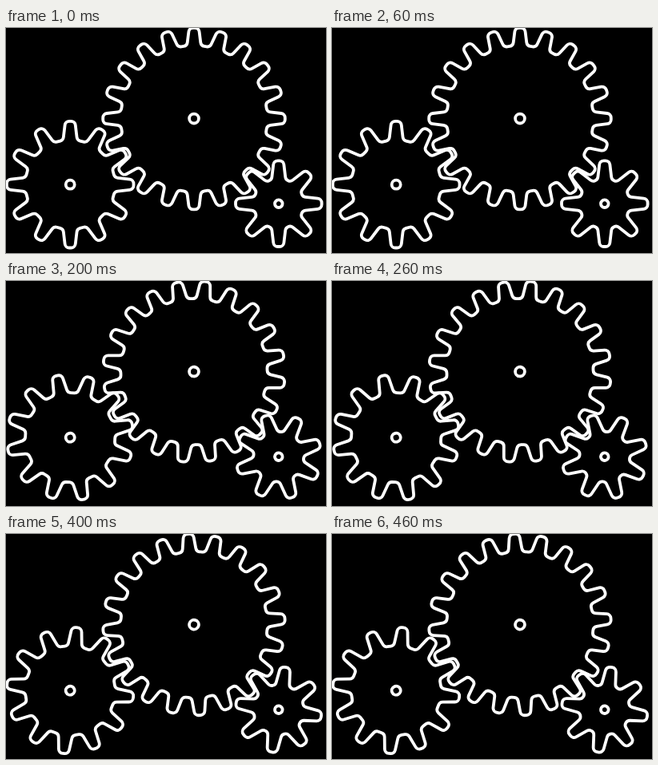
An HTML page with a canvas for the animation above (0.5 s loop, 400 px wide and 282 px high).

```html
<!DOCTYPE html>
<html lang="en">
<head>
<meta charset="utf-8">
<title>Gears</title>
<style>
  html, body { margin: 0; width: 100%; height: 100%; overflow: hidden; background: #000; }
  canvas { display: block; }
</style>
</head>
<body>
<canvas id="stage" width="400" height="282"></canvas>
<script>
const ctx = document.getElementById('stage').getContext('2d');
const STEP_MS = 100, STEPS = 5;

// spin: 1 = clockwise, -1 = counter-clockwise
const gears = [
  { x: 235, y: 113.6, teeth: 20, tip: 113.8, root: 91.3, hub: 5.9, spin: 1 },
  { x: 80.2, y: 196.2, teeth: 12, tip: 79.3, root: 55.6, hub: 5.5, spin: -1 },
  { x: 340.8, y: 220.2, teeth: 8, tip: 53.8, root: 30.2, hub: 4.8, spin: -1 }
];

// Corners of the toothed outline; every tooth has the same profile in pixels.
function outline({ teeth, tip, root }) {
  const profile = [[-8.8, root], [-6, tip], [6, tip], [8.8, root]];
  const points = [];
  for (let i = 0; i < teeth; i++) {
    const a = i / teeth * 2 * Math.PI, c = Math.cos(a), s = Math.sin(a);
    for (const [u, r] of profile) points.push([u * c + r * s, u * s - r * c]);
  }
  return points;
}

function drawGear(gear, phase) {
  ctx.save();
  ctx.translate(gear.x, gear.y);
  ctx.rotate(gear.spin * phase * 2 * Math.PI / gear.teeth);
  const points = outline(gear), n = points.length;
  const [last, first] = [points[n - 1], points[0]];
  ctx.beginPath();
  ctx.moveTo((last[0] + first[0]) / 2, (last[1] + first[1]) / 2);
  points.forEach((p, i) => ctx.arcTo(...p, ...points[(i + 1) % n], 5.5));
  ctx.closePath();
  ctx.moveTo(gear.hub, 0);
  ctx.arc(0, 0, gear.hub, 0, 2 * Math.PI);
  ctx.stroke();
  ctx.restore();
}

// The gears advance one tooth per loop, in hard steps.
function draw() {
  const phase = Math.floor(performance.now() / STEP_MS) % STEPS / STEPS;
  ctx.fillStyle = '#000';
  ctx.fillRect(0, 0, 400, 282);
  ctx.strokeStyle = '#fff';
  ctx.lineWidth = 3.8;
  for (const gear of gears) drawGear(gear, phase);
  requestAnimationFrame(draw);
}
draw();
</script>
</body>
</html>
```
